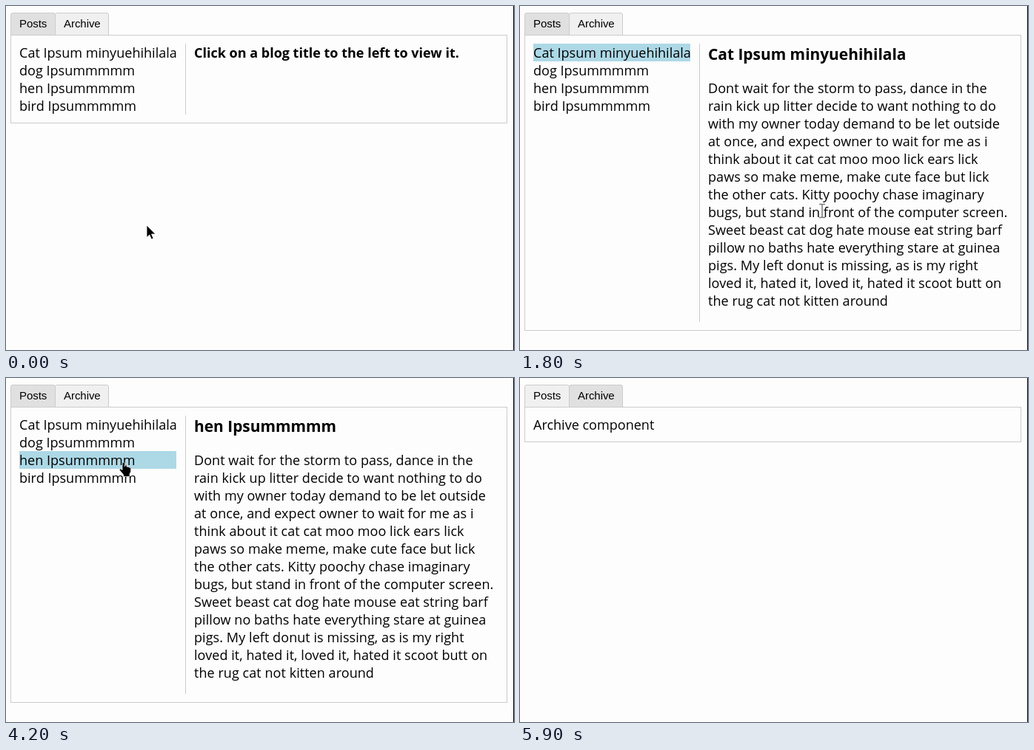
An HTML page that plays this animation: 686 by 466 pixels, repeating every 6000 ms.

```html
<!DOCTYPE html>
<html lang="en">
<head>
<meta charset="utf-8">
<title>Blog tabs</title>
<style>
  html, body { margin: 0; width: 100%; height: 100%; overflow: hidden; background: #fdfdfd; }
  #stage { position: relative; width: 686px; height: 466px; overflow: hidden; box-sizing: border-box;
    border-right: 1px solid #000; color: #000; cursor: none;
    font: 18px/24px "Open Sans", "Noto Sans", sans-serif; letter-spacing: .02px; }
  #stage * { box-sizing: border-box; }
  #stage > *, .list, .article { position: absolute; }
  .tab { top: 9px; height: 31px; padding-left: 11px; border: 1px solid #ccc; border-radius: 3px 3px 0 0;
    background: #f0f0f0; font: 15px/28px "Liberation Sans", Arial, sans-serif; letter-spacing: -.05px; }
  .tab.on { background: #e0e0e0; }
  .pane { left: 6px; top: 39px; width: 671px; border: 1px solid #ccc; }
  .list { left: 11px; top: 11px; bottom: 11px; width: 225px; border-right: 1px solid #ccc; }
  .item { width: 212px; height: 24px; white-space: nowrap; }
  .item.hover { background: #eee; }
  .item.selected { background: lightblue; }
  .article { left: 247px; top: 11px; white-space: pre; letter-spacing: .06px; }
  .article b { display: block; letter-spacing: 0; }
  .article h3 { margin: 0 0 20px; font-size: 20.9px; line-height: 28px; letter-spacing: 0; }
  .archive { left: 18px; top: 51px; }
  svg { left: 0; top: 0; width: 686px; height: 466px; }
  [hidden] { display: none !important; }
</style>
</head>
<body>
<div id="stage">
  <div class="tab" style="left:6px;width:61px">Posts</div>
  <div class="tab" style="left:66px;width:73px">Archive</div>
  <div class="pane">
    <div class="list">
      <div class="item">Cat Ipsum minyuehihilala</div>
      <div class="item">dog Ipsummmmm</div>
      <div class="item">hen Ipsummmmm</div>
      <div class="item">bird Ipsummmmm</div>
    </div>
    <div class="article"><b>Click on a blog title to the left to view it.</b><div class="post"><h3></h3>Dont wait for the storm to pass, dance in the
rain kick up litter decide to want nothing to do
with my owner today demand to be let outside
at once, and expect owner to wait for me as i
think about it cat cat moo moo lick ears lick
paws so make meme, make cute face but lick
the other cats. Kitty poochy chase imaginary
bugs, but stand in front of the computer screen.
Sweet beast cat dog hate mouse eat string barf
pillow no baths hate everything stare at guinea
pigs. My left donut is missing, as is my right
loved it, hated it, loved it, hated it scoot butt on
the rug cat not kitten around</div></div>
  </div>
  <div class="archive">Archive component</div>
  <svg>
    <g class="cursor" data-kind="arrow">
      <path d="M0 0V16.5L3.8 13L6.4 19L9 17.8L6.5 12H11.8Z" stroke="#fff" stroke-width=".8"/>
    </g>
    <g class="cursor" data-kind="hand">
      <path d="M0 1.5Q1.7-1 3.4 1.5V6Q5-.2 6.4 6.5Q8.4 5 9.2 7.2Q11.4 6.2 11.6 8.6V13L10 16V19.5H1.5V17L-3.8 10.5Q-3.6 8.2-1.6 9.2L0 10.6Z" stroke="#fff" stroke-width=".7"/>
    </g>
    <g class="cursor" data-kind="text">
      <path d="M-4-8.5H-1L0-7.5L1-8.5H4M0-7.5V8.5M-4 9.5H-1L0 8.5L1 9.5H4" fill="none" stroke="#777" stroke-width="1.5"/>
    </g>
  </svg>
</div>
<script>
const LOOP = 6000, STEP = 100;
const $ = s => document.querySelector(s);
const $$ = s => [...document.querySelectorAll(s)];
const tabs = $$('.tab'), items = $$('.item'), cursors = $$('.cursor');
const pane = $('.pane'), prompt = $('.article b'), post = $('.post');
const heading = $('h3'), archive = $('.archive');

// Pointer stops: time, x, y
const path = [
  [0, 190, 297], [700, 159, 66], [900, 159, 65], [1200, 159, 65],
  [1800, 408, 277], [1900, 408, 277], [2500, 157, 92], [2800, 157, 92],
  [3200, 350, 308], [3400, 350, 308], [3600, 207, 139], [4000, 157, 114],
  [4200, 157, 114], [4400, 240, 220], [4700, 139, 25], [4800, 122, 27],
  [5500, 122, 27], [5800, 560, 444], [5900, 640, 490], [LOOP, 640, 490]
];
// Times at which each item is opened
const clicks = [1200, 2800, 4200];
const ARCHIVE_AT = 4900;

function pointerAt(t) {
  const i = path.findIndex(p => p[0] > t);
  const [t0, x0, y0] = path[i - 1], [t1, x1, y1] = path[i];
  const u = (t - t0) / (t1 - t0), k = u * u * (3 - 2 * u);
  return [x0 + (x1 - x0) * k, y0 + (y1 - y0) * k];
}

function render(t) {
  const [x, y] = pointerAt(t);
  const onArchive = t >= ARCHIVE_AT;
  const selected = clicks.filter(c => t >= c).length - 1;
  const reading = selected >= 0 && !onArchive;
  const hoverItem = !onArchive && x >= 18 && x < 230 ? Math.floor((y - 51) / 24) : -1;
  const hoverTab = y >= 9 && y < 39 && x >= 6 && x < 140 ? +(x >= 67) : -1;

  tabs.forEach((tab, i) => tab.classList.toggle('on', i === +onArchive || i === hoverTab));
  items.forEach((item, i) => {
    item.classList.toggle('hover', i === hoverItem);
    item.classList.toggle('selected', i === selected);
  });
  for (const child of pane.children) child.hidden = onArchive;
  archive.hidden = !onArchive;
  prompt.hidden = reading;
  post.hidden = !reading;
  if (reading) heading.textContent = items[selected].textContent;
  pane.style.height = (onArchive ? 48 : reading ? 401 : 120) + 'px';

  const overLink = hoverTab >= 0 || items[hoverItem];
  const overText = reading && x >= 254 && x < 660 && y >= 51 && y < 411;
  const kind = overLink ? 'hand' : overText ? 'text' : 'arrow';
  for (const c of cursors) {
    c.style.display = c.dataset.kind === kind ? '' : 'none';
    c.setAttribute('transform', `translate(${Math.round(x)} ${Math.round(y)})`);
  }
}

const start = performance.now();
function tick() {
  const t = (performance.now() - start) % LOOP;
  render(Math.floor(t / STEP) * STEP);
  requestAnimationFrame(tick);
}
tick();
</script>
</body>
</html>
```
